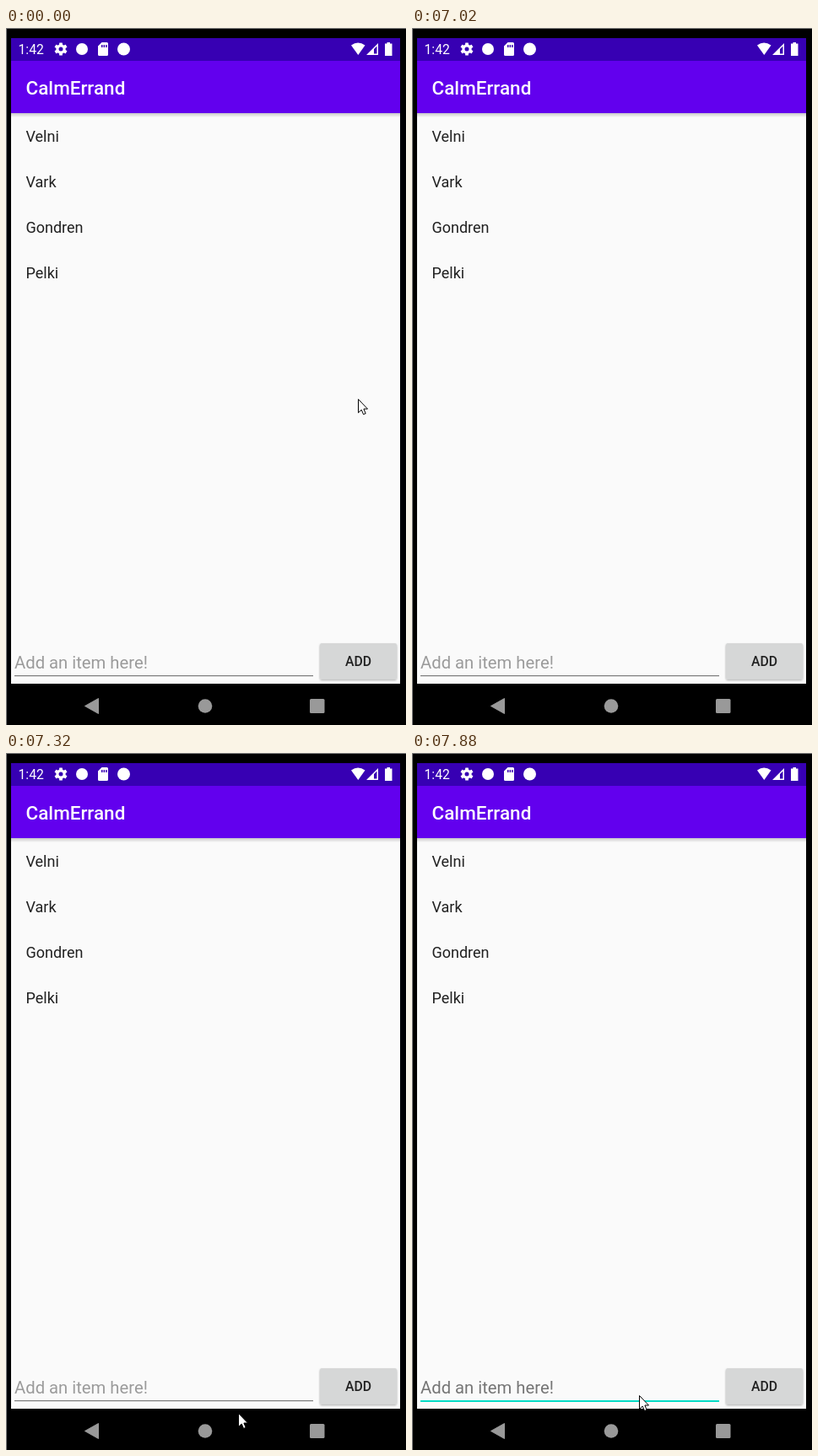
An HTML page that plays this animation: 474x827 px, repeating every 8000 ms.

```html
<!DOCTYPE html>
<html lang="en">
<head>
<meta charset="utf-8">
<title>To-do list</title>
<style>
  html, body { margin: 0; width: 100%; height: 100%; overflow: hidden; background: #000; }
  svg { display: block; }
  text { font-family: Roboto, sans-serif; }
  .medium { font-weight: 500; }
</style>
</head>
<body>
<svg width="474" height="827" viewBox="0 0 474 827">
  <defs>
    <linearGradient id="shade" x2="0" y2="1">
      <stop stop-color="#000" stop-opacity=".2"/>
      <stop offset="1" stop-color="#000" stop-opacity="0"/>
    </linearGradient>
    <filter id="soft" x="-10%" y="-20%" width="120%" height="150%">
      <feDropShadow dx="0" dy="1.3" stdDeviation="1.1" flood-opacity=".35"/>
    </filter>
  </defs>

  <rect width="474" height="827"/>
  <path d="M0 .5H474M.5 0V827" stroke="#777"/>
  <rect x="6" y="101" width="461" height="677" fill="#fafafa"/>
  <rect x="6" y="101" width="461" height="5" fill="url(#shade)"/>
  <rect x="6" y="12" width="461" height="27" fill="#3700b3"/>
  <rect x="6" y="39" width="461" height="62" fill="#6200ee"/>

  <!-- status bar -->
  <g fill="#fff">
    <text x="14.5" y="31" font-size="15.75">1:42</text>
    <g id="gear" transform="translate(65 25)">
      <circle r="4.1" fill="none" stroke="#fff" stroke-width="3.2"/>
    </g>
    <circle cx="90" cy="25" r="7"/>
    <path fill-rule="evenodd" d="M113.5 17H119.5Q121 17 121 18.5V31.5Q121 33 119.5 33H110.5Q109 33 109 31.5V21.5ZM113 20V23H114.5V20ZM115.6 20V23H117.1V20ZM118.2 20V23H119.7V20Z"/>
    <circle cx="139.5" cy="25" r="7.5"/>
    <path d="M409 20.5Q417 14.5 425.5 20.5L417.3 32Z"/>
    <path fill-rule="evenodd" d="M441 18V32H427ZM439.5 21.5L436 25V30.5H439.5Z"/>
    <path d="M451.5 17H455V18.5H457.5V33H449V18.5H451.5Z"/>
    <text class="medium" x="23.5" y="78.5" font-size="22.5">CalmErrand</text>
  </g>

  <g id="list" font-size="18" fill="#212121"></g>

  <!-- input row -->
  <text id="hint" x="10" y="759.5" font-size="20.25">Add an item here!</text>
  <rect id="underline" x="10" y="768" width="354"/>
  <rect x="372" y="730" width="91" height="42.5" rx="2" fill="#d6d7d7" filter="url(#soft)"/>
  <text class="medium" x="417.5" y="757" font-size="15.75" text-anchor="middle" fill="#212121">ADD</text>

  <!-- navigation bar -->
  <g fill="#999">
    <path d="M93.5 804.5L109.5 795.5V813.5Z" stroke="#999" stroke-linejoin="round"/>
    <circle cx="236" cy="804.5" r="8.3"/>
    <rect x="360" y="796" width="17.5" height="17" rx="1.5"/>
  </g>

  <path id="pointer" d="M.5 .5V16.5L4.2 13L6.6 18.5L9.2 17.4L6.9 12H11.5Z" fill="#fff" stroke="#000"/>
</svg>
<script>
const LOOP = 8000, FOCUS_AT = 7880;
// [start time, x, y]; no position means the pointer is hidden
const POINTER = [
  [0, 417, 440], [430, 415, 440], [580, 381, 455], [7020],
  [7170, 370, 733], [7320, 275, 783], [7450, 273, 780], [7600, 269, 762]
];
const $ = id => document.getElementById(id);

function add(parent, tag, attrs, content = "") {
  const node = document.createElementNS("http://www.w3.org/2000/svg", tag);
  for (const key in attrs) node.setAttribute(key, attrs[key]);
  node.textContent = content;
  parent.append(node);
}

["Velni", "Vark", "Gondren", "Pelki"].forEach((name, i) =>
  add($("list"), "text", { x: 23.5, y: 135 + i * 53.9 }, name));

for (let angle = 0; angle < 360; angle += 60)
  add($("gear"), "rect", { x: -1.9, y: -7.6, width: 3.8, height: 3, rx: .5, transform: `rotate(${angle})` });

function draw(now) {
  const t = now % LOOP;
  const [, x, y] = POINTER.findLast(step => step[0] <= t);
  $("pointer").setAttribute("visibility", x === undefined ? "hidden" : "visible");
  if (x !== undefined) $("pointer").setAttribute("transform", `translate(${x} ${y})`);

  const focused = t >= FOCUS_AT;
  $("hint").setAttribute("fill", focused ? "#757575" : "#9b9b9b");
  $("underline").setAttribute("fill", focused ? "#03dac5" : "#7b7b7b");
  $("underline").setAttribute("height", focused ? 2 : 1.2);
}

const start = performance.now();
function tick() {
  draw(performance.now() - start);
  requestAnimationFrame(tick);
}
tick();
</script>
</body>
</html>
```
